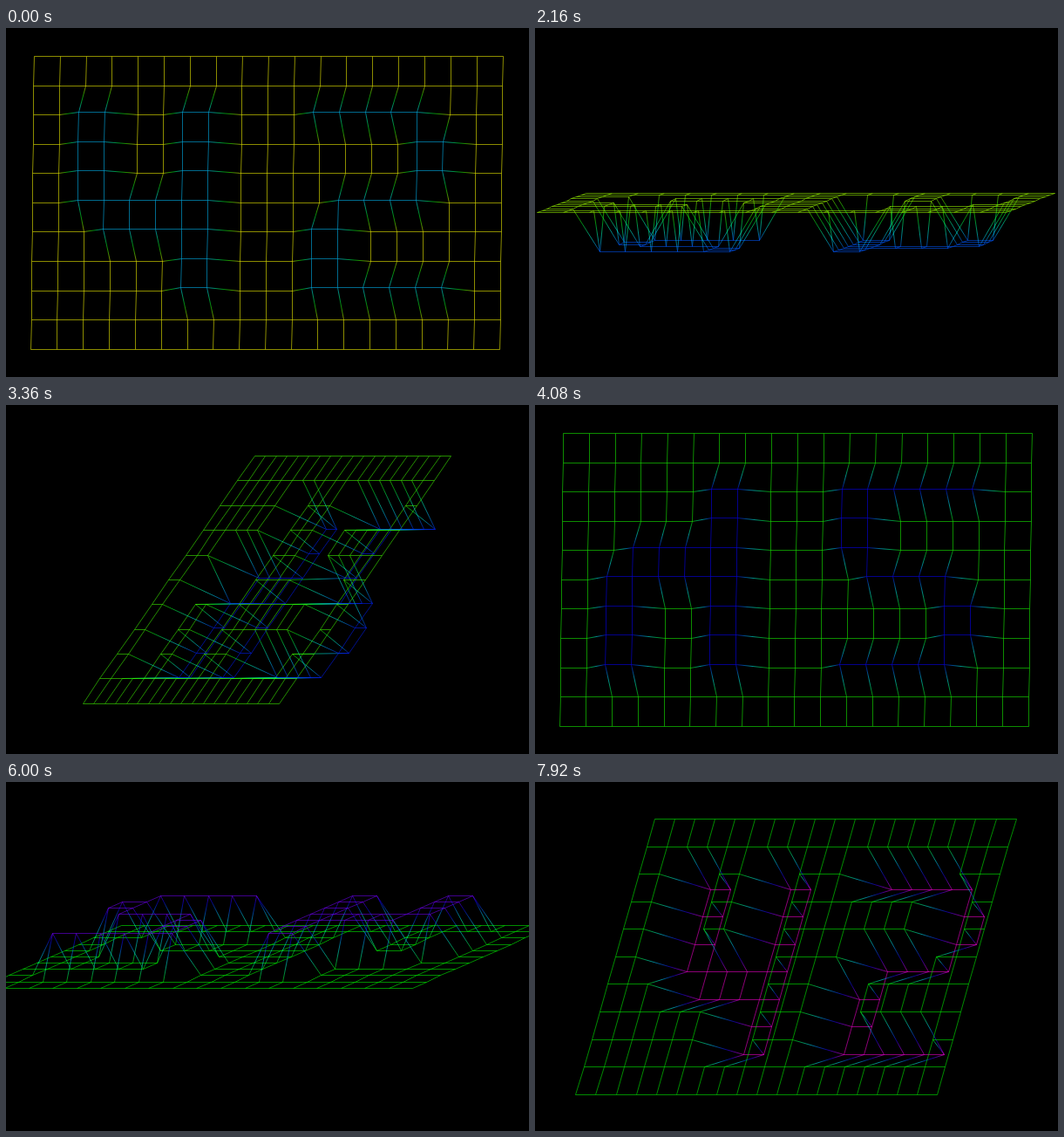
An HTML page with a canvas for the animation above (8 s loop, 600 by 400 pixels).

```html
<!DOCTYPE html>
<html lang="en">
<head>
<meta charset="utf-8">
<title>Wireframe 42</title>
<style>
  html, body { margin: 0; width: 100%; height: 100%; overflow: hidden; background: #000; }
  canvas { display: block; }
</style>
</head>
<body>
<canvas id="stage" width="600" height="400"></canvas>
<script>
const ctx = document.getElementById('stage').getContext('2d');
const STEP = 80, LOOP = 8000, COLS = 19, ROWS = 11;
const flat = '.'.repeat(COLS);
const map = [
  flat,
  flat,
  '..##..##...#####...',
  '..##..##.......##..',
  '..##..##.......##..',
  '..######....####...',
  '...#####...##......',
  '......##...##......',
  '......##...######..',
  flat,
  flat
];

// Eases in from rest, then turns at a constant rate.
const progress = n => n < 10 ? 5 + n * n / 20 : n;

function project(n) {
  const yaw = 8.17 * (progress(n) - 5.95) * Math.PI / 180;
  const tilt = -yaw / 2 - 0.004;
  const sy = Math.sin(yaw), st = Math.sin(tilt), ct = Math.cos(tilt);
  const ax = 543 / 18 * Math.cos(yaw);
  return (c, r, up) => {
    const u = c - 9, v = r - 5;
    const x = 299.5 + ax * u + 40.3 * st * sy * v + up * 60 * ct * sy;
    const y = 200.4 + 33.65 * ct * v - up * 50 * st;
    return { x: Math.floor(x) + 0.5, y: Math.floor(y) + 0.5, up };
  };
}

function draw(n) {
  // The ground drifts from yellow to green, the digits from cyan to purple.
  const low = 90 - 30 * Math.cos(Math.PI * Math.min(1, n / 64));
  const high = 195 + 0.9 * n + 25 * (n / 99) ** 6;
  const colour = k => `hsla(${low + (high - low) * k}, 100%, 50%, 0.55)`;

  function stroke(a, b) {
    let style = colour(a.up);
    if (a.up !== b.up) {
      style = ctx.createLinearGradient(a.x, a.y, b.x, b.y);
      for (let i = 0; i <= 6; i++) {
        const k = i / 6;
        style.addColorStop(k, colour(a.up + (b.up - a.up) * k));
      }
    }
    ctx.strokeStyle = style;
    ctx.beginPath();
    ctx.moveTo(a.x, a.y);
    ctx.lineTo(b.x, b.y);
    ctx.stroke();
  }

  ctx.fillStyle = '#000';
  ctx.fillRect(0, 0, 600, 400);

  const at = project(n);
  const points = map.map((row, r) => [...row].map((ch, c) => at(c, r, ch === '#' ? 1 : 0)));
  for (let r = 0; r < ROWS; r++) {
    for (let c = 0; c < COLS; c++) {
      if (c + 1 < COLS) stroke(points[r][c], points[r][c + 1]);
      if (r + 1 < ROWS) stroke(points[r][c], points[r + 1][c]);
    }
  }
}

const start = performance.now();
function tick() {
  const t = (performance.now() - start) % LOOP;
  draw(Math.floor(t / STEP));
  requestAnimationFrame(tick);
}
tick();
</script>
</body>
</html>
```
